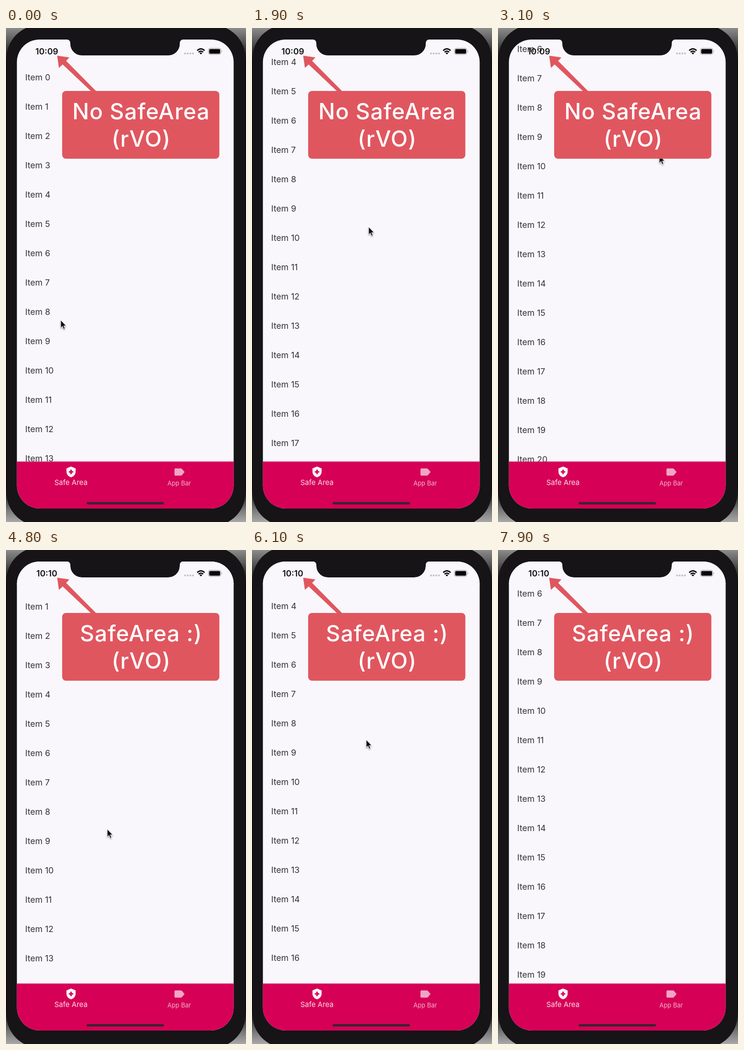
Animation of 500x1028 px, one loop 8000 ms. Source, as an HTML page:

```html
<!DOCTYPE html>
<html lang="en">
<head>
<meta charset="utf-8">
<title>Safe area demo</title>
<style>
  html, body { margin: 0; width: 500px; height: 1028px; overflow: hidden; background: #000; }
  svg { display: block; }
  text { font-family: Inter, sans-serif; }
  #list text { font-size: 17.6px; fill: #333236; }
  #time { font-size: 17.5px; font-weight: 600; fill: #111; }
  .callout { font-size: 46px; font-weight: 500; letter-spacing: 1px; fill: #fff; }
  .mid { text-anchor: middle; }
</style>
</head>
<body>
<svg width="500" height="1028" viewBox="0 0 500 1028">
  <defs>
    <linearGradient id="rim" x1="0" y1="0" x2="0" y2="1">
      <stop offset="0" stop-color="#8c8c8c"/>
      <stop offset=".025" stop-color="#5c5c5c"/>
      <stop offset=".07" stop-color="#000"/>
      <stop offset=".93" stop-color="#000"/>
      <stop offset=".975" stop-color="#777"/>
      <stop offset="1" stop-color="#a8a8a8"/>
    </linearGradient>
    <clipPath id="screen">
      <path d="M22.7 71A47 47 0 0 1 69.7 24H127A7 7 0 0 1 134 31V33A24 24 0 0 0 158 57H338A24 24 0 0 0 362 33V31A7 7 0 0 1 369 24H427.3A47 47 0 0 1 474.3 71V952A48 48 0 0 1 426.3 1000H70.7A48 48 0 0 1 22.7 952Z"/>
    </clipPath>
    <filter id="shadow" x="-50%" y="-50%" width="200%" height="200%">
      <feDropShadow dx="0" dy="2" stdDeviation="1.5" flood-opacity=".4"/>
    </filter>
  </defs>

  <rect width="500" height="1028" fill="url(#rim)"/>
  <rect x="1" y="-6" width="498" height="1042" rx="69" fill="#161417"/>

  <g clip-path="url(#screen)">
    <rect x="22" y="24" width="453" height="976" fill="#f9f7fb"/>
    <g id="list"></g>
    <rect id="inset" x="22" y="24" width="453" height="48" fill="#f9f7fb"/>

    <text id="time" class="mid" x="85" y="55"></text>
    <g fill="#c2c1c6">
      <circle cx="373" cy="53" r="2"/><circle cx="378.5" cy="53" r="2"/>
      <circle cx="384" cy="53" r="2"/><circle cx="389.5" cy="53" r="2"/>
    </g>
    <g fill="none" stroke="#080808" stroke-width="2.7">
      <path d="M398.3 47Q406 39.6 413.7 47"/>
      <path d="M401.2 50.3Q406 45.8 410.8 50.3"/>
    </g>
    <path d="M403.2 52.2Q406 49.8 408.8 52.2L406 55Z" fill="#080808"/>
    <rect x="421.7" y="42.2" width="26" height="12.8" rx="3.6" fill="none" stroke="#9b9a9e"/>
    <rect x="423.3" y="43.8" width="22.8" height="9.6" rx="2.2" fill="#080808"/>
    <path d="M449.3 46.5Q451.5 48.5 449.3 50.8Z" fill="#9b9a9e"/>

    <rect x="22" y="901" width="453" height="2" fill="#b76a8a" opacity=".35"/>
    <rect x="22" y="902.5" width="453" height="98" fill="#d60056"/>
    <path d="M135.5 912.5L145 916.5V923C145 929 141 933.5 135.5 935C130 933.5 126 929 126 923V916.5Z" fill="#fff"/>
    <path d="M135.5 919V928.4M130.8 923.7H140.2" stroke="#d60056" stroke-width="3"/>
    <path d="M353 916.5H364.5Q366 916.5 367 918L372 924L367 930Q366 931.5 364.5 931.5H353Q351 931.5 351 929.5V918.5Q351 916.5 353 916.5Z" fill="#f0a5c5"/>
    <text class="mid" x="135.3" y="951" font-size="15" fill="#fbdde9">Safe Area</text>
    <text class="mid" x="360.8" y="951.5" font-size="13" fill="#f3b2cd">App Bar</text>
    <rect x="168" y="986.5" width="161" height="5" rx="2.5" fill="#38242e"/>
  </g>

  <path id="cursor" d="M0 0V16L3.6 12.6L6.2 18.6L8.8 17.4L6.3 11.7H11.2Z" fill="#111" stroke="#eee" stroke-width=".9" filter="url(#shadow)"/>

  <path d="M107 58L131.5 61.5L125 68.5L188 132H178L118 75.5L110.5 82.5Z" fill="#e0565f" stroke="#d2505a" stroke-width=".6"/>
  <rect x="117" y="131" width="327.5" height="141" rx="8" fill="#e0565f"/>
  <text id="title" class="callout mid" x="281.5" y="190"></text>
  <text class="callout mid" x="281.5" y="247">(rVO)</text>
</svg>
<script>
  const LOOP = 8000, STEP = 100, CUT = 4000, ROW = 61;
  const $ = id => document.getElementById(id);

  // Each track is a list of [ms, value].
  const clips = [
    {
      title: 'No SafeArea', time: '10:09', inset: false,
      scroll: [[500, 0], [1100, 94], [1900, 276], [3100, 425]],
      x: [[0, 114], [300, 134], [500, 134], [1100, 156], [1900, 243], [3100, 336]],
      y: [[0, 608], [300, 688], [500, 688], [1100, 592], [1900, 414], [3100, 265]]
    },
    {
      title: 'SafeArea :)', time: '10:10', inset: true,
      scroll: [[4400, 0], [4800, 46], [6100, 230], [7000, 378]],
      x: [[4000, 190], [4400, 205], [4800, 211], [6100, 238], [7000, 239]],
      y: [[4000, 605], [4400, 627], [4800, 581], [6100, 395], [7000, 247]]
    }
  ];

  // Monotone cubic interpolation, at rest on both ends.
  function sample(track, t) {
    const last = track.length - 1;
    if (t <= track[0][0]) return track[0][1];
    if (t >= track[last][0]) return track[last][1];
    const rate = i => (track[i + 1][1] - track[i][1]) / (track[i + 1][0] - track[i][0]);
    const slope = i => {
      if (i === 0 || i === last) return 0;
      const a = rate(i - 1), b = rate(i);
      return a * b > 0 ? 2 * a * b / (a + b) : 0;
    };
    const i = track.findIndex(p => p[0] > t) - 1;
    const [t0, v0] = track[i], [t1, v1] = track[i + 1];
    const h = t1 - t0, u = (t - t0) / h, w = 1 - u;
    return v0 * w * w * (1 + 2 * u) + v1 * u * u * (3 - 2 * u)
      + h * u * w * (slope(i) * w - slope(i + 1) * u);
  }

  for (let n = 0; n < 22; n++) {
    const row = document.createElementNS('http://www.w3.org/2000/svg', 'text');
    row.setAttribute('x', 40);
    row.setAttribute('y', 109 + n * ROW);
    row.textContent = 'Item ' + n;
    $('list').append(row);
  }

  let shown;
  function draw(ms) {
    const t = Math.floor((ms % LOOP) / STEP) * STEP;
    const clip = clips[t < CUT ? 0 : 1];
    if (clip !== shown) {
      shown = clip;
      $('title').textContent = clip.title;
      $('time').textContent = clip.time;
      $('inset').style.display = clip.inset ? '' : 'none';
    }
    $('list').setAttribute('transform', `translate(0 ${-sample(clip.scroll, t)})`);
    $('cursor').setAttribute('transform', `translate(${sample(clip.x, t)} ${sample(clip.y, t)})`);
  }

  const start = performance.now();
  function tick() {
    draw(performance.now() - start);
    requestAnimationFrame(tick);
  }
  tick();
</script>
</body>
</html>
```
